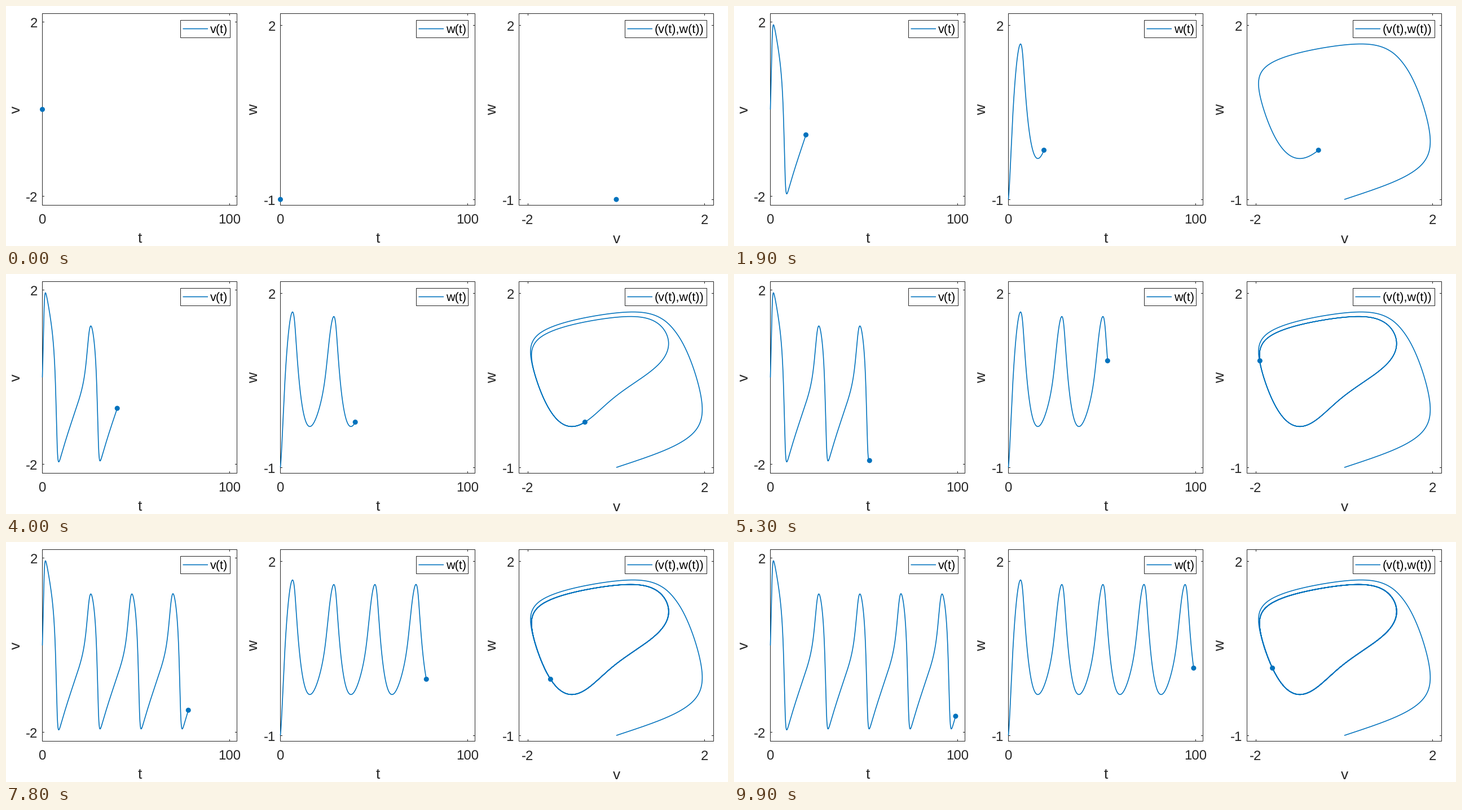
A matplotlib script that plays this animation: 1280x427 px, repeating every 10000 ms.

```python
import matplotlib.pyplot as plt
from matplotlib.animation import FuncAnimation
from matplotlib.patches import Circle, Rectangle
import numpy as np

W, H, DPI = 1280, 427, 64
PT = 72 / DPI  # points per pixel
BLUE, INK = "#0072BD", "#262626"
TOP, BOTTOM, WIDTH = 13, 354, 345
FRAMES, STEPS = 100, 50  # one time unit per frame

plt.rcParams["font.family"] = "Liberation Sans"
plt.rcParams["text.hinting"] = "none"

# Dormand-Prince 5(4): stages, error weights and dense output
STAGES = [
    [1 / 5],
    [3 / 40, 9 / 40],
    [44 / 45, -56 / 15, 32 / 9],
    [19372 / 6561, -25360 / 2187, 64448 / 6561, -212 / 729],
    [9017 / 3168, -355 / 33, 46732 / 5247, 49 / 176, -5103 / 18656],
    [35 / 384, 0, 500 / 1113, 125 / 192, -2187 / 6784, 11 / 84],
]
ERROR = np.array([71 / 57600, 0, -71 / 16695, 71 / 1920, -17253 / 339200,
                  22 / 525, -1 / 40])
DENSE = np.array([
    [1, -183 / 64, 37 / 12, -145 / 128],
    [0, 0, 0, 0],
    [0, 1500 / 371, -1000 / 159, 1000 / 371],
    [0, -125 / 32, 125 / 12, -375 / 64],
    [0, 9477 / 3392, -729 / 106, 25515 / 6784],
    [0, -11 / 7, 11 / 3, -55 / 28],
    [0, 3 / 2, -4, 5 / 2],
])


def rate(s):
    """FitzHugh-Nagumo oscillator."""
    v, w = s
    return np.array([v - v**3 / 3 - w + 0.5, (v + 0.8 - 0.7 * w) / 4])


def solve(times, end, rtol=1e-3, floor=1e-3):
    """Adaptive integration, sampled at the given times."""
    now, s = 0.0, np.array([0.0, -1.0])
    out = np.empty((2, len(times)))
    h = 0.8 * rtol**0.2 / np.max(np.abs(rate(s)) / np.maximum(np.abs(s), floor))
    while now < end:
        h = min(h, end / 10)
        if 1.1 * h >= end - now:
            h = end - now
        failed = False
        while True:
            k = [rate(s)]
            for row in STAGES:
                new = s + h * np.dot(row, k)
                k.append(rate(new))
            size = np.maximum(np.maximum(np.abs(s), np.abs(new)), floor)
            err = h * np.max(np.abs(ERROR @ k) / size)
            if err <= rtol:
                break
            h *= 0.5 if failed else max(0.1, 0.8 * (rtol / err)**0.2)
            failed = True
        inside = (times >= now) & (times <= now + h)
        u = (times[inside] - now) / h
        powers = np.array([u, u**2, u**3, u**4])
        out[:, inside] = s[:, None] + h * np.array(k).T @ DENSE @ powers
        now, s = (end if h == end - now else now + h), new
        if not failed:
            h /= max(0.2, 1.25 * (err / rtol)**0.2)
    return out


t = np.arange((FRAMES - 1) * STEPS + 1) / STEPS
v, w = solve(t, 100.0)

# Whole coordinates are pixel centres
fig = plt.figure(figsize=(W / DPI, H / DPI), dpi=DPI, facecolor="white")
ax = fig.add_axes([0, 0, 1, 1])
ax.set_xlim(-0.5, W - 0.5)
ax.set_ylim(H - 0.5, -0.5)
ax.axis("off")


def label(x, y, text, size, ha="center", color=INK, angle=0):
    ax.text(x, y, text, fontsize=size * PT, ha=ha, va="baseline", color=color,
            rotation=angle, rotation_mode="anchor", zorder=7)


def segment(xs, ys, color=INK, width=1.0, z=2):
    return ax.plot(xs, ys, color=color, lw=width * PT, zorder=z, snap=False,
                   solid_capstyle="butt", solid_joinstyle="round")[0]


def box(x0, y0, x1, y1, z):
    ax.add_patch(Rectangle((x0, y0), x1 - x0, y1 - y0, fc="white", ec=INK,
                           lw=PT, zorder=z, snap=False))


class Panel:
    def __init__(self, left, xs, ys, xlim, ylim, xticks, yticks, names,
                 legend, legend_left):
        self.left, self.xlim, self.ylim = left, xlim, ylim
        right = left + WIDTH
        box(left, TOP, right, BOTTOM, 1)
        for value in xticks:
            x = round(self.px(value))
            segment([x, x], [BOTTOM, BOTTOM - 3.5])
            segment([x, x], [TOP, TOP + 3.5])
            label(x - 0.5, 387.5, str(value), 24)
        for value in yticks:
            y = round(self.py(value))
            segment([left, left + 3.5], [y, y])
            segment([right, right - 3.5], [y, y])
            label(left - 8, y + 9.5, str(value), 24, "right")
        label(left + WIDTH / 2, 421, names[0], 26.4)
        label(left - 40, 183.5, names[1], 26.4, angle=90)

        box(legend_left, 25, right - 12, 56, 5)
        segment([legend_left + 4, legend_left + 48.5], [40, 40], BLUE, 1.6, 6)
        label(legend_left + 52.5, 48, legend, 21.6, "left", "black")

        self.x, self.y = self.px(xs), self.py(ys)
        self.line = segment([], [], BLUE, 1.6, 3)
        self.dot = ax.add_patch(Circle((0, 0), 4.5, fc=BLUE, lw=0, zorder=4))

    def px(self, value):
        lo, hi = self.xlim
        return self.left + (value - lo) / (hi - lo) * WIDTH

    def py(self, value):
        lo, hi = self.ylim
        return BOTTOM - (value - lo) / (hi - lo) * (BOTTOM - TOP)

    def show(self, n):
        self.line.set_data(self.x[:n + 1], self.y[:n + 1])
        self.dot.center = self.x[n], self.y[n]
        return self.line, self.dot


T_LIM, V_LIM, W_LIM = (0, 104), (-2.2, 2.2), (-1.1, 2.2)
panels = [
    Panel(64, t, v, T_LIM, V_LIM, (0, 100), (-2, 2), "tv", "v(t)", 309),
    Panel(486, t, w, T_LIM, W_LIM, (0, 100), (-1, 2), "tw", "w(t)", 727),
    Panel(909, v, w, V_LIM, W_LIM, (-2, 2), (-1, 2), "vw", "(v(t),w(t))",
          1097),
]


def draw(frame):
    return [artist for p in panels for artist in p.show(frame * STEPS)]


anim = FuncAnimation(fig, draw, frames=FRAMES, interval=100, repeat=True,
                     repeat_delay=0)
plt.show()
```
